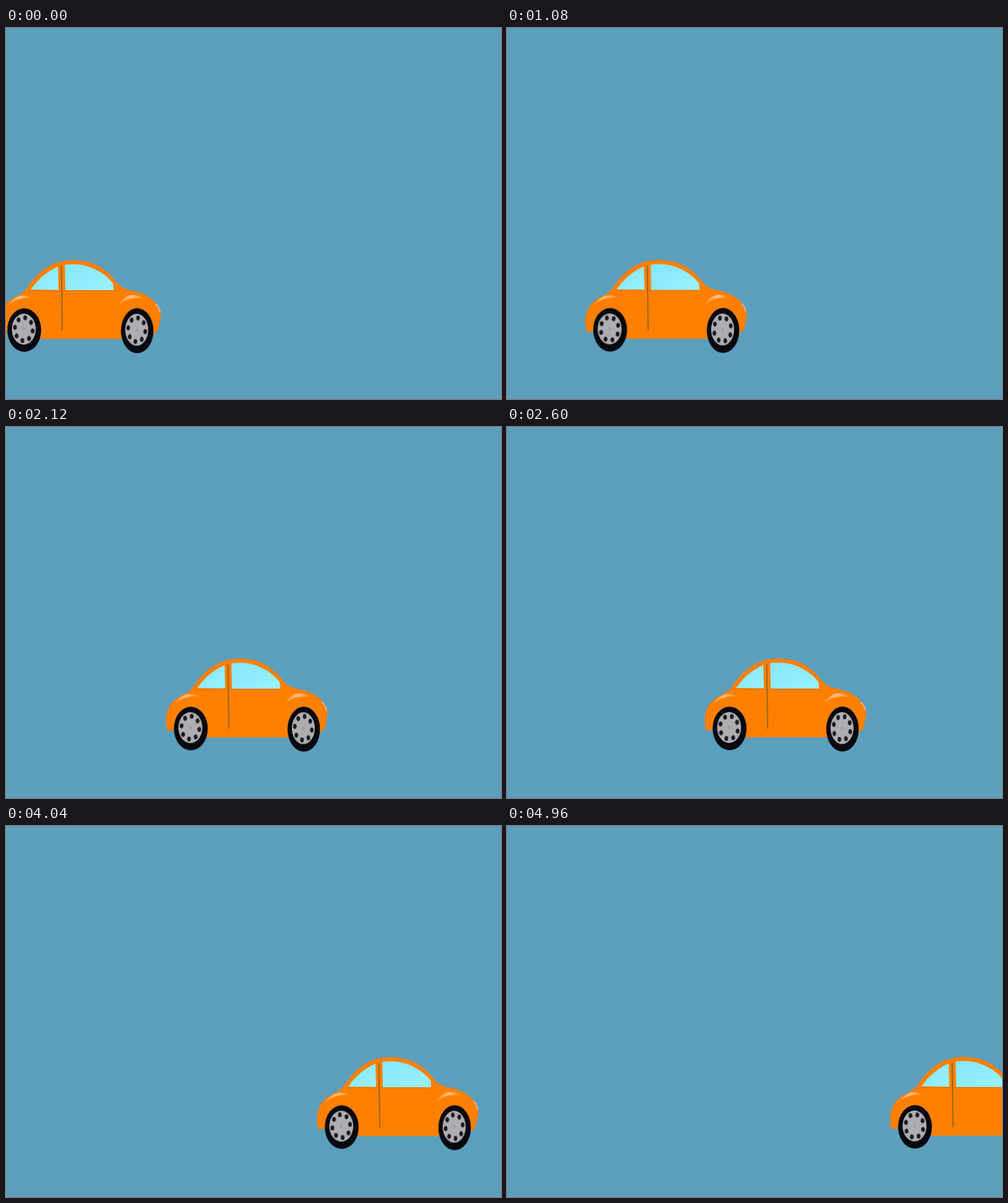
Recreate the animation shown at these times as an HTML page without scripts. Size 800 px wide and 600 px high, loop 5 s.

```html
<!DOCTYPE html>
<html lang="en">
<head>
<meta charset="utf-8">
<title>Orange car</title>
<style>
  html, body { margin: 0; height: 100%; overflow: hidden; background: #5c9fbd; }
  svg { display: block; width: 100%; height: 100%; }
  .car { animation: drive 5s steps(125) infinite; }
  .hub { animation: roll 5s steps(125) infinite; }
  @keyframes drive { to { transform: translate(635px, -2px); } }
  @keyframes roll { to { transform: rotate(1125deg); } }
</style>
</head>
<body>
<svg viewBox="0 0 800 600">
  <defs>
    <linearGradient id="glass" x2="1" y2="1">
      <stop offset="0" stop-color="#86e6fb"/>
      <stop offset="1" stop-color="#9af3ff"/>
    </linearGradient>
    <linearGradient id="shine" x2="1">
      <stop offset="0" stop-color="#ff9a3a"/>
      <stop offset=".5" stop-color="#ffbe80"/>
      <stop offset="1" stop-color="#ff8a1c"/>
    </linearGradient>
    <g id="holes" fill="#1b1b20">
      <circle id="hole" cy="-19" r="4"/>
      <use href="#hole" transform="rotate(45)"/>
      <use href="#hole" transform="rotate(90)"/>
      <use href="#hole" transform="rotate(135)"/>
    </g>
    <!-- Round wheel, squeezed horizontally where it is placed -->
    <g id="wheel">
      <circle r="36" fill="#07090f"/>
      <g transform="translate(-1 -1.5)">
        <circle r="25.5" fill="#b0adb0"/>
        <g class="hub">
          <use href="#holes"/>
          <use href="#holes" transform="rotate(180)"/>
          <circle r="3" fill="#a19fa3"/>
        </g>
      </g>
    </g>
  </defs>

  <rect width="800" height="600" fill="#5c9fbd"/>

  <g class="car">
    <path fill="#ff8000" stroke="#e08224" d="M-9 491C-12 470 -10 455 3 443C13 434 25 433 33 422
      C46 402 64 384 88 378Q110 373 134 379C154 385 169 398 179 412Q187 421 199 424
      C219 427 234 435 243 446Q251 454 250 466L246 487L240 494L186 502.5H57L2 491Z"/>
    <path fill="none" stroke="#e27608" stroke-width="1.5" d="M36 425H177"/>
    <g fill="url(#glass)">
      <path d="M40 423Q58 397 84 386L85 423.5Z"/>
      <path d="M95 383C127 378 156 392 173 413L174 424H96Z"/>
    </g>
    <path fill="none" stroke="#96661c" stroke-width="2" d="M89.5 385L91 489"/>
    <g fill="url(#shine)">
      <path d="M2 450Q19 424 43 437Q18 434 2 450Z"/>
      <path d="M183 447Q198 422 224 438Q199 433 183 447Z"/>
    </g>
    <path fill="none" stroke="#cbb9a0" stroke-width="2" d="M242 446Q248 452 249 460"/>
    <use href="#wheel" transform="translate(29.5 488.5) scale(.76 .98)"/>
    <use href="#wheel" transform="translate(212 489.5) scale(.73 1.01)"/>
  </g>
</svg>
</body>
</html>
```
